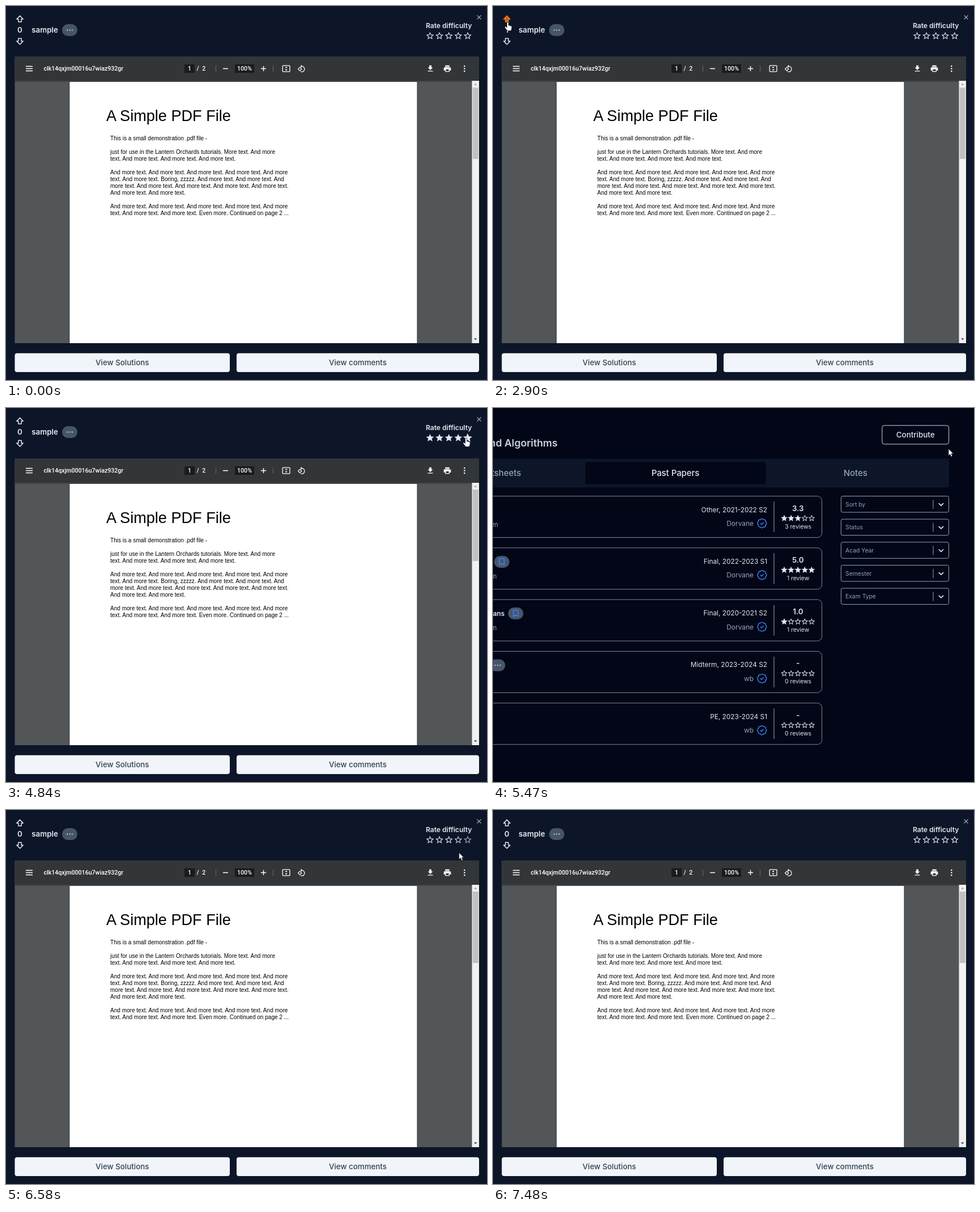
An HTML page that plays this animation: 849 px wide and 660 px high, repeating every 8250 ms.

```html
<!DOCTYPE html>
<html lang="en">
<head>
<meta charset="utf-8">
<title>Voting and rating a paper</title>
<style>
  html, body { margin: 0; width: 100%; height: 100%; overflow: hidden; background: #0d1628; }
  svg { display: block; width: 849px; height: 660px; }
  text { font-family: Inter, sans-serif; white-space: pre; }
  .viewer text { font-family: Roboto, sans-serif; font-weight: 500; }
  .viewer .sheet text { font-family: "Liberation Sans", Arial, sans-serif; font-weight: 400; }
  .paper { filter: drop-shadow(0 0 1.5px rgba(0, 0, 0, .5)); }
</style>
</head>
<body>
<svg id="stage" viewBox="0 0 849 660" xmlns="http://www.w3.org/2000/svg"></svg>
<script>
const LOOP = 8250;
const INK = '#e2e8f0', MUTED = '#94a3b8', LINE = '#7b8797';
const ORANGE = '#f97316', BLUE = '#2563eb';

// Markup helpers
const attrs = o => Object.entries(o).map(([k, v]) => ` ${k}="${v}"`).join('');
const rect = (x, y, w, h, fill, o = {}) =>
  `<rect${attrs({ x, y, width: w, height: h, fill, ...o })}/>`;
const path = (d, o = {}) => `<path${attrs({ d, ...o })}/>`;
const line = (d, stroke, width = 1, o = {}) =>
  path(d, { fill: 'none', stroke, 'stroke-width': width, ...o });
const text = (s, x, y, size, fill, o = {}) =>
  `<text${attrs({ x, y, 'font-size': size, fill, ...o })}>${s}</text>`;
const group = (s, o = {}) => `<g${attrs(o)}>${s}</g>`;
const icon = (d, x, y, scale, fill) =>
  path(d, { fill, transform: `translate(${x} ${y}) scale(${scale}) translate(-12 -12)` });
const END = { 'text-anchor': 'end' }, MID = { 'text-anchor': 'middle' };
const SEMI = { 'font-weight': 600 }, MEDIUM = { 'font-weight': 500 };

const STAR = 'M12 17.27L18.18 21l-1.64-7.03L22 9.24l-7.19-.61L12 2 9.19 8.63 2 9.24l5.46 4.73L5.82 21z';
const STAR_EMPTY = 'M22 9.24l-7.19-.62L12 2 9.19 8.63 2 9.24l5.46 4.73L5.82 21 12 17.27 18.18 21l-1.63-7.03L22 9.24zM12 15.4l-3.76 2.27 1-4.28-3.32-2.88 4.38-.38L12 6.1l1.71 4.04 4.38.38-3.32 2.88 1 4.28L12 15.4z';
const DOWNLOAD = 'M19 9h-4V3H9v6H5l7 7 7-7zM5 18v2h14v-2H5z';
const PRINT = 'M19 8H5c-1.66 0-3 1.34-3 3v6h4v4h12v-4h4v-6c0-1.66-1.34-3-3-3zm-3 11H8v-5h8v5zm3-7c-.55 0-1-.45-1-1s.45-1 1-1 1 .45 1 1-.45 1-1 1zm-1-9H6v4h12V3z';
const ROTATE = 'M7.34 6.41L.86 12.9l6.49 6.48 6.49-6.48-6.5-6.49zM3.69 12.9l3.66-3.66L11 12.9l-3.66 3.66-3.65-3.66zm15.67-6.26C17.61 4.88 15.3 4 13 4V.76L8.76 5 13 9.24V6c1.79 0 3.58.68 4.95 2.05 2.73 2.73 2.73 7.17 0 9.9C16.58 19.32 14.79 20 13 20c-.97 0-1.94-.21-2.84-.61l-1.49 1.49C10.02 21.62 11.51 22 13 22c2.3 0 4.61-.88 6.36-2.64 3.52-3.51 3.52-9.21 0-12.72z';
const BADGE = 'M3.85 8.62a4 4 0 0 1 4.78-4.77 4 4 0 0 1 6.74 0 4 4 0 0 1 4.78 4.78 4 4 0 0 1 0 6.74 4 4 0 0 1-4.77 4.78 4 4 0 0 1-6.75 0 4 4 0 0 1-4.78-4.77 4 4 0 0 1 0-6.76ZM8.7 12.2l2.2 2.2 4.4-4.4';

function pill(x, y, mark) {
  const cx = x + 13.5, cy = y + 10.5;
  const inner = mark === 'dots'
    ? [-4.4, 0, 4.4].map(d => `<circle${attrs({ cx: cx + d, cy, r: 1.25, fill: '#a9b6c7' })}/>`).join('')
    : line(`M${cx - 4.3} ${cy + 5.6}v-10q0-1.4 1.4-1.4h5.8q1.4 0 1.4 1.4v10l-4.3-3z`, '#3b82f6', 1.5, { 'stroke-linejoin': 'round' });
  return rect(x, y, 27, 21, '#475569', { rx: 10.5 }) + inner;
}

function viewer() {
  const lines = [
    [0, 'This is a small demonstration .pdf file -'],
    [2, 'just for use in the Lantern Orchards tutorials. More text. And more'],
    [3, 'text. And more text. And more text. And more text.'],
    [5, 'And more text. And more text. And more text. And more text. And more'],
    [6, 'text. And more text. Boring, zzzzz. And more text. And more text. And'],
    [7, 'more text. And more text. And more text. And more text. And more text.'],
    [8, 'And more text. And more text.'],
    [10, 'And more text. And more text. And more text. And more text. And more'],
    [11, 'text. And more text. And more text. Even more. Continued on page 2 ...']
  ];
  const sheet = rect(112.4, 134, 613, 461, '#fff', { class: 'paper' }) +
    text('A Simple PDF File', 177, 203, 27.1, '#000') +
    lines.map(([n, s]) => text(s, 184, 237.2 + n * 11.99, 10.04, '#000')).join('');
  const bar = rect(15.5, 89.5, 819.5, 42.5, '#323639') +
    rect(15.5, 132, 807, 2, '#43474a') +
    line('M35 106.5h12M35 110.5h12M35 114.5h12', '#fff', 1.6) +
    text('clk14qxjm00016u7wiaz932gr', 66.5, 114, 10.6, '#fff') +
    rect(315, 103, 18, 15, '#191b1c') + text('1', 324, 114.2, 10.6, '#fff', MID) +
    text('/', 338.7, 114.2, 10.6, '#fff', MID) + text('2', 349.2, 114.2, 10.6, '#fff', MID) +
    line('M370.5 105v11M471.5 105v11', '#66696c') +
    line('M383 110.5h9M450 110.5h9M454.5 106v9', '#fff', 1.4) +
    rect(404, 103, 34, 15, '#191b1c') + text('100%', 421, 114.2, 10.6, '#fff', MID) +
    rect(488.2, 105.2, 12.8, 10.6, 'none', { stroke: '#fff', 'stroke-width': 1.3, rx: 1 }) +
    path('M494.6 106.8l2.2 2.5h-4.4zM494.6 114.2l2.2-2.5h-4.4z', { fill: '#fff' }) +
    icon(ROTATE, 521.5, 110.7, .61, '#fff') +
    icon(DOWNLOAD, 749, 110.5, .633, '#fff') + icon(PRINT, 779, 110.5, .633, '#fff') +
    [106, 110.5, 115].map(cy => `<circle${attrs({ cx: 809.3, cy, r: 1.3, fill: '#fff' })}/>`).join('');
  const scroll = rect(822.5, 132, 12.5, 463, '#f1f1f1') + rect(823.8, 144, 10, 126, '#c1c1c1') +
    path('M828.7 136.4l2.8 3.2h-5.6z', { fill: '#a3a3a3' }) +
    path('M828.7 589.8l2.8-3.2h-5.6z', { fill: '#505050' });
  return group(rect(15.5, 89.5, 819.5, 505.5, '#525659') +
    group(sheet, { class: 'sheet' }) + rect(15.5, 595, 819.5, 6, '#0d1628') + bar + scroll, { class: 'viewer' });
}

function modal() {
  const arrow = { 'stroke-width': 1.5, 'stroke-linejoin': 'round' };
  const button = (x, w, s) => rect(x, 612.8, w, 33.2, '#f1f5f9', { rx: 4 }) +
    text(s, x + w / 2, 634, 13.35, '#334155', { ...MID, ...MEDIUM });
  return rect(0, 0, 849, 660, '#0d1628') +
    path('M24.5 17.4l5.7 5.8h-3.1v4.8h-5.2v-4.8h-3.1z', { id: 'up', ...arrow }) +
    path('M24.5 67.8l5.7-5.8h-3.1v-4.8h-5.2v4.8h-3.1z', { id: 'down', ...arrow }) +
    text('0', 24.5, 47.2, 13.33, INK, { id: 'count', ...MID, ...SEMI }) +
    text('sample', 45.2, 47.2, 13.35, INK, SEMI) + pill(99, 32, 'dots') +
    text('Rate difficulty', 822.3, 38.8, 12.1, INK, { ...END, ...SEMI }) +
    group('', { id: 'stars' }) +
    line('M831.5 16.5l7 7M838.5 16.5l-7 7', '#a3adbb', 1.1) +
    viewer() + button(15.5, 379.5, 'View Solutions') + button(407, 428, 'View comments');
}

function listing() {
  const papers = [
    ['Other, 2021-2022 S2', 'Dorvane', '3.3', 3, '3 reviews'],
    ['Final, 2022-2023 S1', 'Dorvane', '5.0', 5, '1 review'],
    ['Final, 2020-2021 S2', 'Dorvane', '1.0', 1, '1 review'],
    ['Midterm, 2023-2024 S2', 'wb', '-', 0, '0 reviews'],
    ['PE, 2023-2024 S1', 'wb', '-', 0, '0 reviews']
  ];
  const card = ([exam, owner, score, filled, reviews], i) => group(
    rect(-60, 155.5, 640.5, 73, 'none', { rx: 8, stroke: LINE }) +
    line('M496 165v54', MUTED) +
    text(exam, 484, 183.6, 11.85, INK, END) + text(owner, 460, 208, 11.95, MUTED, END) +
    line(BADGE, '#3b82f6', 1.8, { transform: 'translate(465.2 193.9) scale(.8)', 'stroke-linecap': 'round' }) +
    text(score, 538.3, 181.6, 13.33, INK, { ...MID, ...SEMI }) +
    [0, 1, 2, 3, 4].map(n => icon(n < filled ? STAR : STAR_EMPTY, 514 + 12.1 * n, 194.4, .59, INK)).join('') +
    text(reviews, 538.5, 212.6, 10.3, INK, MID),
    { transform: `translate(0 ${i * 91.3})` });
  const filter = (s, i) => group(
    rect(614.3, 155.5, 190.2, 28.5, 'none', { rx: 3, stroke: MUTED }) +
    text(s, 622, 173.6, 10.35, MUTED) + line('M777 162v16', MUTED) +
    line('M786.8 168.2l4.1 4 4.1-4', INK, 1.7),
    { transform: `translate(0 ${i * 40.65})` });
  return rect(0, 0, 849, 660, '#020617') +
    text('Data Structures and Algorithms', 114, 68.4, 17.7, '#cbd5e1', { ...END, ...SEMI }) +
    rect(686.8, 30.8, 117.8, 33, 'none', { rx: 4, stroke: '#cbd5e1' }) +
    text('Contribute', 745.7, 51.6, 13.4, INK, { ...MID, ...MEDIUM }) +
    rect(-20, 89.5, 825, 50.5, '#0d1628', { rx: 4 }) + rect(163, 95.5, 318.5, 39, '#020617', { rx: 4 }) +
    text('Cheatsheets', 49.5, 120.2, 14.9, MUTED, { ...END, ...MEDIUM }) +
    text('Past Papers', 322, 120.2, 14.9, INK, { ...MID, ...MEDIUM }) +
    text('Notes', 639.7, 120.2, 14.9, MUTED, { ...MID, ...MEDIUM }) +
    papers.map(card).join('') +
    text('pm', 9, 209.6, 11.8, MUTED, END) + text('pm', 6.5, 300.9, 11.8, MUTED, END) +
    text('pm', 6.5, 392.2, 11.8, MUTED, END) + text('with ans', 20.5, 366.6, 11.8, INK, { ...END, ...SEMI }) +
    pill(2, 261, 'mark') + pill(26.6, 352, 'mark') + pill(-5.4, 443.5, 'dots') +
    ['Sort by', 'Status', 'Acad Year', 'Semester', 'Exam Type'].map(filter).join('');
}

const pointer = { fill: '#fff', stroke: '#10151f', 'stroke-width': .8, 'stroke-linejoin': 'round' };
const HAND = 'M-1.5 1.3a1.5 1.5 0 0 1 3 0v4.2l4 .9q2 .5 1.8 2.5l-.7 4.4q-.3 2-2 2h-4.2q-1 0-1.7-.9l-3.6-4.6q-.8-1.2.3-1.8 1-.5 2 .5l1.1 1z';
const ARROW = 'M0 0v12l2.7-2.5 2 4.5 2.2-1-2-4.3h3.8z';

const $ = id => document.getElementById(id);
$('stage').innerHTML = group(listing(), { id: 'listing' }) + group(modal(), { id: 'modal' }) +
  path(ARROW, { id: 'cursor', ...pointer });

// Timelines
const cursorPath = [ // time, x, y of the pointer tip
  [930, -9, 130], [1130, 8, 74], [1380, 22, 27], [1600, 22, 27], [1750, 23.5, 57],
  [1890, 25.5, 64.5], [2490, 25.5, 64.5], [2760, 26, 28.5], [3490, 26, 28.5],
  [4290, 788, 47], [4320, 788, 47], [4700, 812, 53], [5160, 812, 53], [5450, 804, 72],
  [5670, 804, 72], [5780, 812, 53], [6060, 812, 53], [6520, 800, 74],
  [6660, 799, 77], [6950, 799, 77], [7480, 862, 104]
];
const votes = [[0, 0], [1480, 1], [2080, -1], [2850, 1], [3170, 0]];
const ratings = [[0, 0], [5000, 5], [6030, 0]];
const reloads = [[5400, 5520], [6380, 6490]];

const clamp = v => Math.max(0, Math.min(1, v));
const ease = u => u * u * (3 - 2 * u);
const latest = (steps, t) => steps.filter(s => s[0] <= t).pop();
const inside = (p, x, y, w, h) => p && p.x >= x && p.x <= x + w && p.y >= y && p.y <= y + h;

function cursorAt(t) {
  const i = cursorPath.findIndex(k => k[0] > t);
  if (i < 1) return null;
  const [a, ax, ay] = cursorPath[i - 1], [b, bx, by] = cursorPath[i];
  const u = ease((t - a) / (b - a));
  return { x: ax + (bx - ax) * u, y: ay + (by - ay) * u };
}

function paintArrow(el, color, hover, on, fade) {
  el.setAttribute('stroke', hover || on ? color : INK);
  el.setAttribute('fill', color);
  el.setAttribute('fill-opacity', on ? fade : 0);
}

function paintStars(t, rating, hovered) {
  const shown = hovered >= 0 && t < 6030 ? hovered + 1 : rating;
  let out = '';
  for (let n = 0; n < 5; n++) {
    const dim = t >= 6490 && t < 6640 ? [0, 0, 0, .18, .5][n] * clamp((6640 - t) / 100) : 0;
    const scale = .694 * (n === hovered ? 1.15 : 1);
    out += group(icon(n < shown ? STAR : STAR_EMPTY, 748.45 + 16.6 * n, 52.6, scale, INK), { opacity: 1 - dim });
  }
  $('stars').innerHTML = out;
}

function render(t) {
  const away = reloads.some(([a, b]) => t >= a && t < b);
  $('listing').style.display = away ? '' : 'none';
  $('modal').style.display = away ? 'none' : '';

  const p = cursorAt(t);
  const overUp = inside(p, 16, 15, 17, 17), overDown = inside(p, 16, 54, 17, 17);
  const overStars = !away && inside(p, 740, 44, 83, 17);

  const [since, vote] = latest(votes, t);
  const fade = clamp((t - since + 30) / 100);
  paintArrow($('up'), ORANGE, overUp, vote > 0, fade);
  paintArrow($('down'), BLUE, overDown, vote < 0, fade);
  $('count').textContent = vote;

  paintStars(t, latest(ratings, t)[1], overStars ? Math.floor((p.x - 740) / 16.61) : -1);

  const cursor = $('cursor');
  cursor.style.display = p ? '' : 'none';
  if (p) {
    cursor.setAttribute('d', overUp || overDown || overStars ? HAND : ARROW);
    cursor.setAttribute('transform', `translate(${p.x.toFixed(2)} ${p.y.toFixed(2)})`);
  }
}

const start = performance.now();
function tick() {
  render((performance.now() - start) % LOOP);
  requestAnimationFrame(tick);
}
tick();
</script>
</body>
</html>
```
